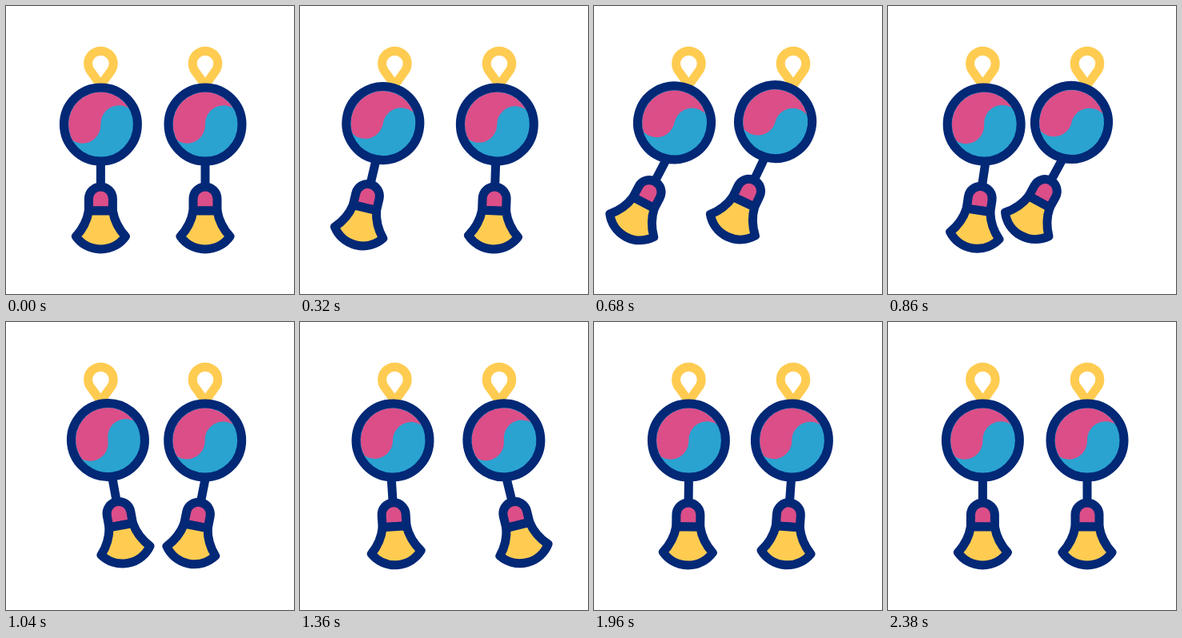
Write an HTML page that moves like this. It is 360x360 px and loops after 2400 ms.

```html
<!DOCTYPE html>
<html lang="en">
<head>
<meta charset="utf-8">
<title>Swinging earrings</title>
<style>
  html, body { margin: 0; width: 100%; height: 100%; overflow: hidden; background: #fff; }
  svg { display: block; width: 100%; height: 100%; }
  .line { stroke: #022876; stroke-width: 11; stroke-linecap: round; stroke-linejoin: round; }
  .pink { fill: #db4e88; }
  .blue { fill: #2aa3d0; }
  .gold { fill: #ffcc51; }
  .hook { fill: none; stroke: #ffcc51; stroke-width: 11; stroke-linejoin: round; }
</style>
</head>
<body>
<svg id="stage" viewBox="0 0 360 360" xmlns="http://www.w3.org/2000/svg"></svg>
<script>
const LOOP = 2400;
const ARM = 76;      // hook centre to bead centre
const RADIUS = 51;   // bead centre to tassel joint
const stage = document.getElementById('stage');

// [time in ms, angle in degrees]
const beadSwing = [[0, 0], [560, 18], [1000, -7], [1490, 3.5], [1940, 0]];
const tasselSwing = [[180, 0], [725, 14.2], [1205, -9.8], [1615, 3.6], [2100, 0]];

const earrings = [{ x: 118.4, delay: 0 }, { x: 249, delay: 200 }];

function earringMarkup({ x }) {
  return `<g transform="translate(${x} 72)">
    <path class="hook" d="M0 27 L-12.4 9.8 A15.8 15.8 0 1 1 12.4 9.8 Z"/>
    <g class="bead">
      <g class="tassel">
        <path class="line" d="M0 -3 V28"/>
        <path class="line pink" d="M-15 57 V42 A15 15 0 0 1 15 42 V57 Z"/>
        <path class="line gold" d="M-15 57 H15 Q18 75 31 89 A38 38 0 0 1 -31 89 Q-18 75 -15 57 Z"/>
      </g>
      <g transform="translate(0 ${ARM})">
        <circle class="blue" r="42"/>
        <path class="pink" d="M-35 20 A40.3 40.3 0 0 1 35 -20 A22.7 22.7 0 0 0 0 0 A22.7 22.7 0 0 1 -35 20 Z"/>
        <circle class="line" r="46" fill="none"/>
      </g>
    </g>
  </g>`;
}

function swing(keys, t) {
  if (t <= keys[0][0]) return keys[0][1];
  for (let i = 1; i < keys.length; i++) {
    const [t0, a0] = keys[i - 1], [t1, a1] = keys[i];
    if (t < t1) {
      const k = (t - t0) / (t1 - t0);
      return a0 + (a1 - a0) * (1 - Math.cos(Math.PI * k)) / 2;
    }
  }
  return keys[keys.length - 1][1];
}

stage.innerHTML = earrings.map(earringMarkup).join('');
const beads = stage.querySelectorAll('.bead');
const tassels = stage.querySelectorAll('.tassel');

function draw(t) {
  earrings.forEach(({ delay }, i) => {
    const local = t - delay;
    beads[i].setAttribute('transform', `rotate(${swing(beadSwing, local)})`);
    tassels[i].setAttribute('transform',
      `translate(0 ${ARM + RADIUS}) rotate(${swing(tasselSwing, local)})`);
  });
}

const start = performance.now();
function tick() {
  draw((performance.now() - start) % LOOP);
  requestAnimationFrame(tick);
}
draw(0);
requestAnimationFrame(tick);
</script>
</body>
</html>
```
